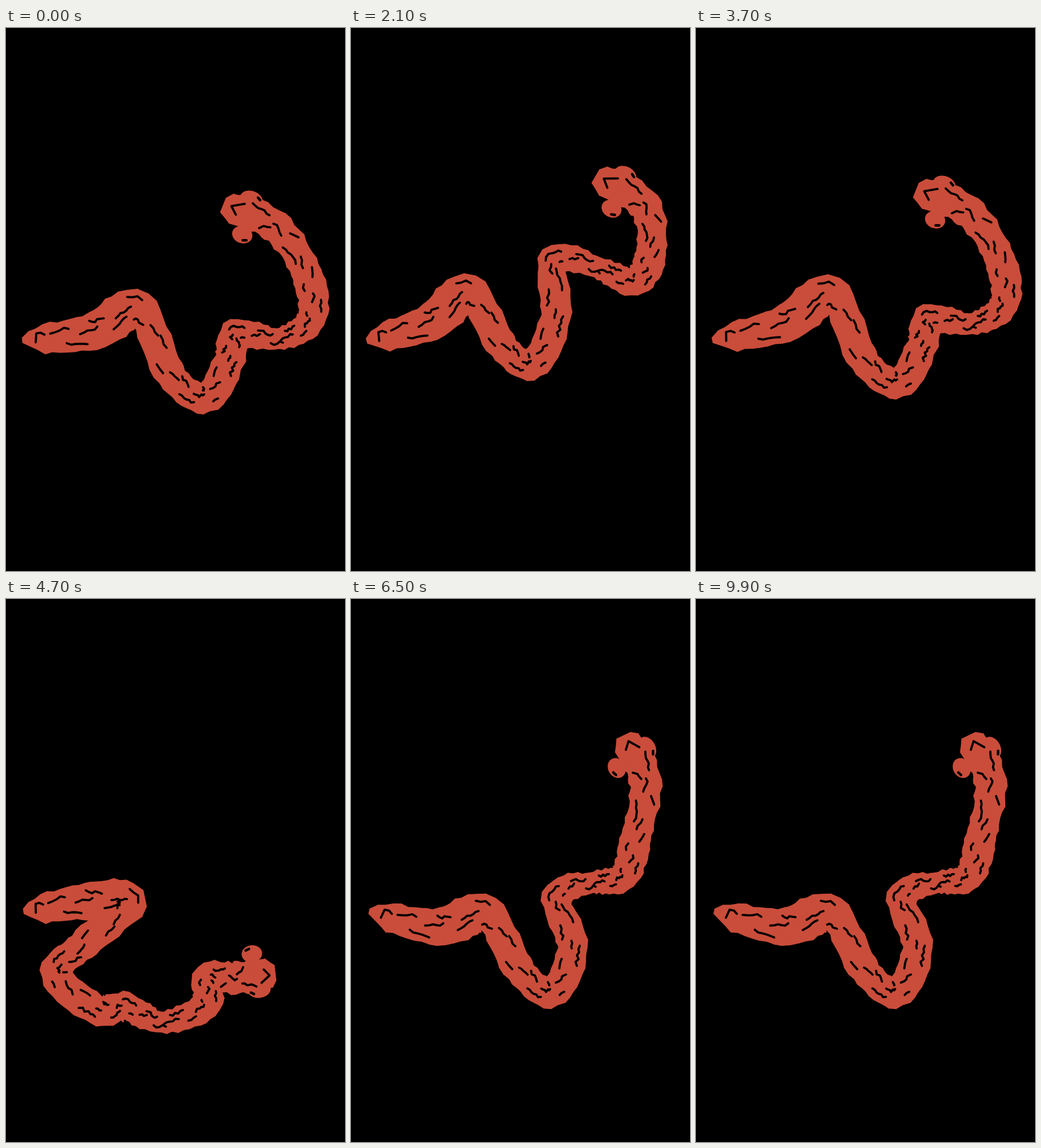
Animation of 592 by 947 pixels, one loop 10000 ms. Source, as an HTML page with a canvas:

```html
<!DOCTYPE html>
<html lang="en">
<head>
<meta charset="utf-8">
<title>Worm</title>
<style>
  html, body { margin: 0; width: 100%; height: 100%; overflow: hidden; background: #000; }
  canvas { display: block; width: 100vw; height: 100vh; }
</style>
</head>
<body>
<canvas id="stage" width="592" height="947"></canvas>
<script>
const ctx = document.getElementById('stage').getContext('2d');
const RED = '#c94d3a', LOOP = 10000, STEP = 100, SUB = 10;

// Joints of the spine from tail to head, as x, y pairs.
const rise = [29,545, 150,530, 233,491, 288,606, 350,645, 390,580, 402,532, 475,542, 533,508, 526,430, 470,346, 380,308];
const zigzag = [27,547, 118,519, 173,474, 232,555, 277,582, 313,490, 293,338, 372,355, 443,434, 515,413, 537,335, 457,274];
const curl = [34,545, 122,571, 186,575, 133,685, 160,739, 238,672, 260,585, 333,562, 375,505, 340,428, 266,353, 170,313];
const low = [31,545, 140,528, 214,532, 132,605, 87,655, 158,716, 210,711, 271,738, 348,710, 354,660, 400,661, 470,653];
const rest = [32,545, 150,572, 238,550, 295,648, 352,686, 387,608, 359,518, 420,495, 476,484, 498,415, 514,318, 477,238];
const LAST = rest.length / 2 - 1;

const mix = (a, b, k) => a.map((v, i) => v + (b[i] - v) * k);
// Shifts the body; the shift grows from the fixed tail to its full size at joint `reach`.
const pull = (pose, dx, dy, reach = LAST) =>
  pose.map((v, i) => v + (i % 2 ? dy : dx) * Math.min(1, (i >> 1) / reach));

const high = pull(rise, 5, -26, 2);
const keys = [
  [0, rise],
  [300, pull(rise, -5, -97)],
  [750, mix(rise, curl, .75)],
  [1300, zigzag],
  [1700, pull(zigzag, 3, -145)],
  [2200, mix(zigzag, high, .6)],
  [2900, curl],
  [3100, mix(rise, curl, 1.1)],
  [3700, high],
  [4050, pull(high, 20, -194)],
  [4400, pull(curl, -160, -42)],
  [4700, low],
  [4950, pull(low, 10, 186)],
  [5500, mix(low, rest, .88)],
  [6300, rest]
];

const hash = n => { const s = Math.sin(n * 127.1 + 11.7) * 43758.5453; return s - Math.floor(s); };
const bump = (u, mid, size, power = 2) => Math.exp(-(Math.abs((u - mid) / size) ** power));

function poseAt(t) {
  const n = keys.length - 1;
  if (t >= keys[n][0]) return rest;
  const k = keys.findIndex(key => key[0] > t) - 1;
  const slope = (i, c) => i < 0 || i >= n ? 0
    : (keys[i + 1][1][c] - keys[i][1][c]) / (keys[i + 1][0] - keys[i][0]);
  // Harmonic mean of both slopes: smooth, without overshoot.
  const speed = (i, c) => {
    const a = slope(i - 1, c), b = slope(i, c);
    return a * b <= 0 ? 0 : 2 * a * b / (a + b);
  };
  const [t0, from] = keys[k], [t1, to] = keys[k + 1];
  const span = t1 - t0, f = (t - t0) / span, g = 1 - f;
  return from.map((v, c) => v * g * g * (1 + 2 * f) + to[c] * f * f * (3 - 2 * f)
    + span * f * g * (g * speed(k, c) - f * speed(k + 1, c)));
}

// Catmull-Rom through get(0..LAST).
function spline(get, u) {
  const i = Math.min(Math.floor(u), LAST - 1), f = u - i;
  const b = get(i), c = get(i + 1);
  const a = i ? get(i - 1) : 2 * b - c;
  const d = i + 2 > LAST ? 2 * c - b : get(i + 2);
  return b + .5 * f * (c - a + f * (2 * a - 5 * b + 4 * c - d + f * (3 * (b - c) + d - a)));
}

// Half width: pointed tail, thick rear, thin neck, round head.
function width(u) {
  const tail = Math.min(1, .1 + (u / .35) ** .7);
  const head = Math.sqrt(1 - Math.max(0, (u - LAST + .3) / .34) ** 2);
  return (25 + 9 * bump(u, 1.5, .7, 4) - 6 * bump(u, 7, .8) + 2 * bump(u, 10.4, .7)) * tail * head;
}

// Returns a map from place along (u) and across (v) the body to stage pixels.
function makeBody(pose) {
  const point = u => [0, 1].map(c => spline(k => pose[2 * k + c], u));
  return (u, v, extra = 0) => {
    const [x, y] = point(u);
    const [ax, ay] = point(Math.max(0, u - .05)), [bx, by] = point(Math.min(LAST, u + .05));
    const off = (v * width(u) + extra) / (Math.hypot(bx - ax, by - ay) || 1);
    return [x - (by - ay) * off, y + (bx - ax) * off];
  };
}

function trace(points) {
  ctx.beginPath();
  points.forEach(p => ctx.lineTo(...p));
  ctx.stroke();
}

function drawSkin(at) {
  const rim = i => [-1, 1].map(side => at(i / SUB, side, side * (hash(i * 2 + side) * 5 - 2)));
  ctx.lineWidth = 1.5;
  let [left, right] = rim(0);
  for (let i = 1; i <= LAST * SUB; i++) {
    const [l, r] = rim(i);
    trace([left, right, r, l, left]);
    ctx.fill();
    [left, right] = [l, r];
  }
}

function drawWrinkles(at) {
  const lanes = [-.5, .45, -.05];
  ctx.lineWidth = 3.8;
  for (let i = 0; i < 44; i++) {
    const u = .45 + i * .23 + hash(i) * .1, v = lanes[i % 3] + (hash(i + 50) - .5) * .25;
    const half = .05 + .13 * hash(i + 90), tilt = (hash(i + 130) - .5) * .3;
    const steps = Math.max(2, Math.round(half * 34));
    trace(Array.from({ length: steps + 1 }, (_, k) => {
      const f = 2 * k / steps - 1;
      return at(u + half * f, v + tilt * f, (hash(i * 9 + k) - .5) * 5);
    }));
  }
  trace([at(.18, .3), at(.2, -.5), at(.26, -.45), at(.31, -.25)]);
  trace([at(10.65, .5), at(10.86, .1), at(10.74, -.35)]);
}

// Paints in a frame whose x axis points to the tip of the head.
function drawHead(at, paint) {
  const [x, y] = at(10.55, 0), [tipX, tipY] = at(LAST, 0);
  ctx.save();
  ctx.translate(x, y);
  ctx.rotate(Math.atan2(tipY - y, tipX - x));
  paint();
  ctx.restore();
}

function blob(x, y, rx, ry) {
  ctx.beginPath();
  ctx.ellipse(x, y, rx, ry, 0, 0, 7);
  ctx.fill();
}

function draw(t) {
  const at = makeBody(poseAt(t));
  ctx.fillStyle = '#000';
  ctx.fillRect(0, 0, 592, 947);
  ctx.lineCap = ctx.lineJoin = 'round';
  ctx.fillStyle = ctx.strokeStyle = RED;
  drawSkin(at);
  drawHead(at, () => {
    blob(2, 25, 20, 14);
    blob(-3, -39, 18, 15);
  });
  ctx.strokeStyle = '#000';
  drawWrinkles(at);
  drawHead(at, () => {
    ctx.lineWidth = 4.5;
    trace([[-13, 28], [-8, 31]]);
    trace([[-13, -46], [-7, -48]]);
  });
}

let shown = -1;
function tick() {
  const t = Math.floor(performance.now() % LOOP / STEP) * STEP;
  if (t !== shown) draw(shown = t);
  requestAnimationFrame(tick);
}
tick();
</script>
</body>
</html>
```
